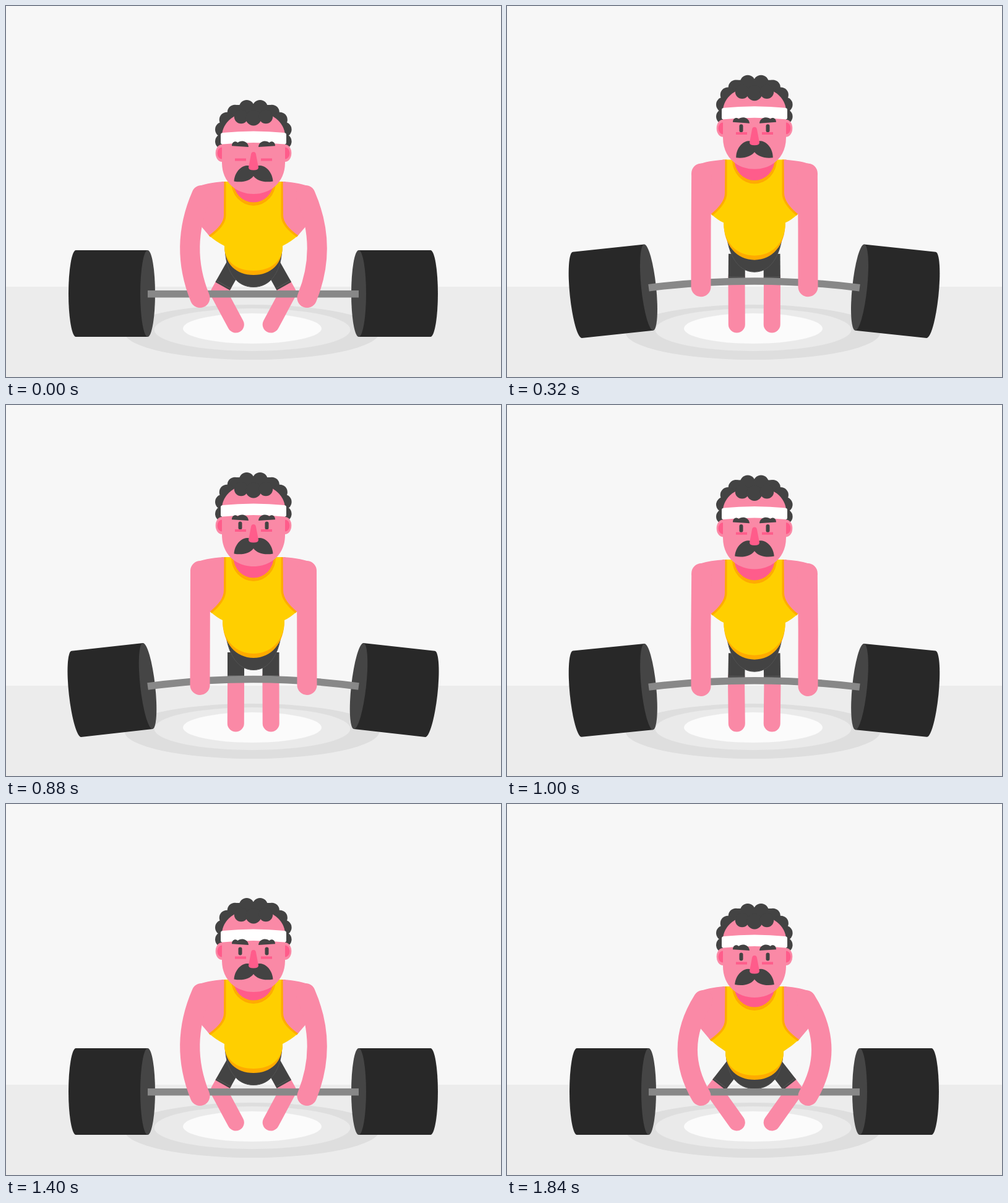
Recreate the animation shown at these times as an HTML page. Size 800x600 px, loop 1.88 s.

```html
<!DOCTYPE html>
<html lang="en">
<head>
<meta charset="utf-8">
<title>Weightlifter</title>
<style>
  html, body { margin: 0; width: 100%; height: 100%; overflow: hidden; background: #f7f7f7; }
  svg { display: block; width: 100vw; height: 100vh; }
  .skin { fill: #fa89a6; }
  .blush { fill: #ff5c8b; }
  .dark { fill: #434343; }
  .limb { fill: none; stroke: #fa89a6; stroke-linecap: round; stroke-linejoin: round; }
</style>
</head>
<body>
<svg viewBox="0 0 800 600">
  <rect y="454" width="800" height="146" fill="#ececec"/>
  <ellipse cx="397.5" cy="527.5" rx="206" ry="44.5" fill="#dedede"/>
  <ellipse cx="398" cy="523.5" rx="158.5" ry="34.5" fill="#eaeaea"/>
  <ellipse cx="398" cy="521.5" rx="112" ry="24.5" fill="#fbfbfb"/>

  <g id="weight">
    <g id="disc">
      <path d="M0 -70H-116A12 70 0 0 0 -116 70H0Z" fill="#282828"/>
      <ellipse rx="12" ry="70" fill="#454545"/>
    </g>
  </g>
  <use href="#weight" transform="matrix(-1 0 0 1 799 0)"/>

  <g id="leg">
    <path id="shin" class="limb" stroke-width="27"/>
    <path id="thigh" fill="none" stroke="#434343" stroke-width="27"/>
    <path id="cuff" fill="none" stroke="#585858" stroke-width="1"/>
  </g>
  <use href="#leg" transform="matrix(-1 0 0 1 799.5 0)"/>
  <path id="pelvis" class="dark" stroke="#525252" stroke-width="1"/>
  <path id="bar" fill="none" stroke="#888" stroke-width="11.5"/>

  <path id="hem" fill="#ffab00"/>
  <path id="shirt" fill="#ffcf00"/>
  <g id="side">
    <path id="armhole" fill="none" stroke="#ffab00" stroke-width="7"/>
    <path id="chest" class="skin"/>
    <path id="arm" class="limb" stroke-width="32"/>
  </g>
  <use href="#side" transform="matrix(-1 0 0 1 800 0)"/>
  <g id="neck">
    <path d="M364 0A36 39 0 0 0 436 0Z" fill="#ffab00"/>
    <path d="M367.5 0A32.5 33.5 0 0 0 432.5 0Z" class="blush"/>
  </g>

  <g id="head">
    <g id="curls" class="dark"></g>
    <g id="ear">
      <ellipse cx="349" cy="238" rx="10.3" ry="14" class="skin"/>
      <ellipse cx="349" cy="238" rx="7.5" ry="9.5" class="blush"/>
    </g>
    <use href="#ear" transform="matrix(-1 0 0 1 800 0)"/>
    <path class="skin" d="M349 210A51 40 0 0 1 451 210V253C451 285 428 304 400 304S349 285 349 253Z"/>
    <g id="fringe" class="dark"><rect x="372" y="160" width="56" height="22"/></g>
    <path fill="#fff" d="M347 208Q347 205.500 350 205Q400 200 450 205Q453 205.500 453 208V221Q453 224 450 223.500Q400 218.500 350 223.500Q347 224 347 221Z"/>
    <g id="brows" class="dark">
      <path id="brow" d="M365 226.200C365 219.500 371 217.500 374.500 221C378 217 391 217 392 228Z"/>
      <use href="#brow" transform="matrix(-1 0 0 1 800 0)"/>
    </g>
    <g id="eyes" class="dark">
      <rect x="375.500" y="231.500" width="6" height="13" rx="3"/>
      <rect x="418.500" y="231.500" width="6" height="13" rx="3"/>
    </g>
    <path id="bags" class="blush" d="M370 246.500H388V250.500H370ZM412 246.500H430V250.500H412Z"/>
    <g id="whisker">
      <path id="lobe" class="dark" d="M400 263C394 256 386 257 380 261.500C373 266.500 369 275 368.500 283.500C382 286 394 283 400 275L401 270Z"/>
    </g>
    <use href="#whisker" transform="matrix(-1 0 0 1 800 0)"/>
    <path class="blush" d="M396 240Q396.500 236 400 236Q403.500 236 404 240L408 261Q408 265.500 400 265.500Q392 265.500 392 261Z"/>
  </g>
</svg>
<script>
const LOOP = 1880, STEP = 40;
const el = id => document.getElementById(id);
const setPath = (id, d) => el(id).setAttribute('d', d);
const place = (id, transform) => el(id).setAttribute('transform', transform);
const clamp = u => Math.min(1, Math.max(0, u));
const easeInOut = u => u < .5 ? 4 * u ** 3 : 1 - 4 * (1 - u) ** 3;

function addCircles(id, list) {
  el(id).innerHTML += list.map(([x, y, r]) => `<circle cx="${x}" cy="${y}" r="${r}"/>`).join('');
}
const halfCurls = [[389, 164.3], [370, 172], [357, 184], [350.3, 199.7], [350.3, 219]];
addCircles('curls', halfCurls.flatMap(([x, y]) => [[x, y, 12.3], [799.6 - x, y, 12.3]]));
addCircles('fringe', [[380, 179, 11.2], [400, 181, 12.5], [420, 179, 11.2]]);

// lift: 0 squatting, 1 standing; dip: extra crouch at the end
const liftAt = t => easeInOut(clamp(t / 428)) - easeInOut(clamp((t - 860) / 475));
const dipAt = t => clamp((t - 1600) / 240) ** 1.8;
const headAt = t => 43 * (1 - liftAt(t)) + 9 * dipAt(t);

const belly = (x, top, bottom) => {
  const side = top + .62 * (bottom - top);
  return `C${x} ${side} 372 ${bottom} 400 ${bottom}S${800 - x} ${side} ${800 - x} ${top}`;
};

function drawLegs(low, dip) {
  const hip = [371.5, 400 + 15 * low + 2 * dip];
  const knee = [371.5 - 27.5 * low ** 1.5 - 9 * dip, 453 + 11 * low];
  const dx = hip[0] - knee[0], dy = hip[1] - knee[1], len = Math.hypot(dx, dy);
  const ux = dx / len, uy = dy / len;
  const along = n => [knee[0] + ux * n, knee[1] + uy * n];
  const [cx, cy] = along(15.5);
  setPath('shin', `M371.3 515L${knee}L${along(16)}`);
  setPath('thigh', `M${hip}L${along(12.5)}`);
  setPath('cuff', `M${cx - uy * 13.5} ${cy + ux * 13.5}L${cx + uy * 13.5} ${cy - ux * 13.5}`);
}

function drawTorso(low, dip) {
  const top = 246 + 38 * low + 11 * dip;
  const waistX = 350 + 3 * low, waist = 348 + 40 * low + 12 * dip;
  const hem = 409 + 26 * low + 11 * dip;
  const pitX = 330 - 2 * low, pit = 334 + 37 * low + 10 * dip;
  const lat = `Q${pitX + 11} ${pit + 10} ${waistX} ${waist}`;
  const latBack = `Q${789 - pitX} ${pit + 10} ${800 - pitX} ${pit}`;
  const bend = top + 54;

  setPath('pelvis', `M354 ${waist}${belly(354, waist, 428.5 + 26 * low + 6 * dip)}Z`);
  setPath('hem', `M${waistX} ${waist}${belly(waistX, waist, hem)}Z`);
  setPath('shirt', `M352 ${top}V${bend}C352 ${bend + 12} 343 ${pit - 11} ${pitX} ${pit}${lat}` +
    `${belly(waistX, waist, hem - 7)}${latBack}C457 ${pit - 11} 448 ${bend + 12} 448 ${bend}V${top}Z`);
  setPath('armhole', `M352 ${top}V${bend}C352 ${bend + 12} 343 ${pit - 11} ${pitX} ${pit}`);
  place('neck', `translate(0 ${top})`);

  const shoulderX = 314 + 2 * low + dip, shoulder = top + 22;
  const gapX = 330 - 14 * low - 4 * dip, gap = 335 + 22 * low + 5 * dip;
  setPath('chest', `M352.5 ${top}Q${shoulderX + 6} ${top + 2} ${shoulderX - 7} ${top + 9}` +
    `Q${shoulderX - 15} ${top + 14} ${shoulderX - 16} ${shoulder + 2}` +
    `L${gapX - 5} ${gap}H${gapX}L${pitX} ${pit}C343 ${pit - 11} 352 ${bend + 12} 352 ${bend}Z`);

  const hand = 453 + 19 * low;
  const elbowOut = 16.5 * low ** 1.6 + 6 * dip;
  const elbowX = (shoulderX + 313.5) / 2 - 2 * elbowOut - 2 * low;
  setPath('arm', `M${shoulderX} ${shoulder}Q${elbowX} ${(shoulder + hand) / 2} 313.5 ${hand}`);
}

function drawBarbell(lift) {
  const end = 465.7 - 10.7 * lift, middle = 465.7 - 22.2 * lift;
  place('disc', `translate(229 ${465 - 10.5 * lift}) rotate(${-6.4 * lift})`);
  setPath('bar', `M229 ${end}Q399.5 ${2 * middle - end} 570 ${end}`);
}

function drawHead(t, lift) {
  const drop = headAt(t);
  const lag = headAt(Math.max(0, t - 100)) - drop;
  place('head', `translate(0 ${drop - 43})`);
  place('brows', `translate(0 ${2 * lift})`);
  place('bags', `translate(0 ${-2.5 * lift})`);
  place('lobe', `rotate(${-lag * (lag > 0 ? .22 : .14)} 400 258)`);
  el('eyes').style.display = t < STEP ? 'none' : '';
}

function render(time) {
  const t = Math.floor((time % LOOP) / STEP) * STEP;
  const lift = liftAt(t), dip = dipAt(t), low = Math.max(0, 1 - lift);
  drawBarbell(lift);
  drawLegs(low, dip);
  drawTorso(low, dip);
  drawHead(t, lift);
}

function tick() {
  render(performance.now());
  requestAnimationFrame(tick);
}
tick();
</script>
</body>
</html>
```
